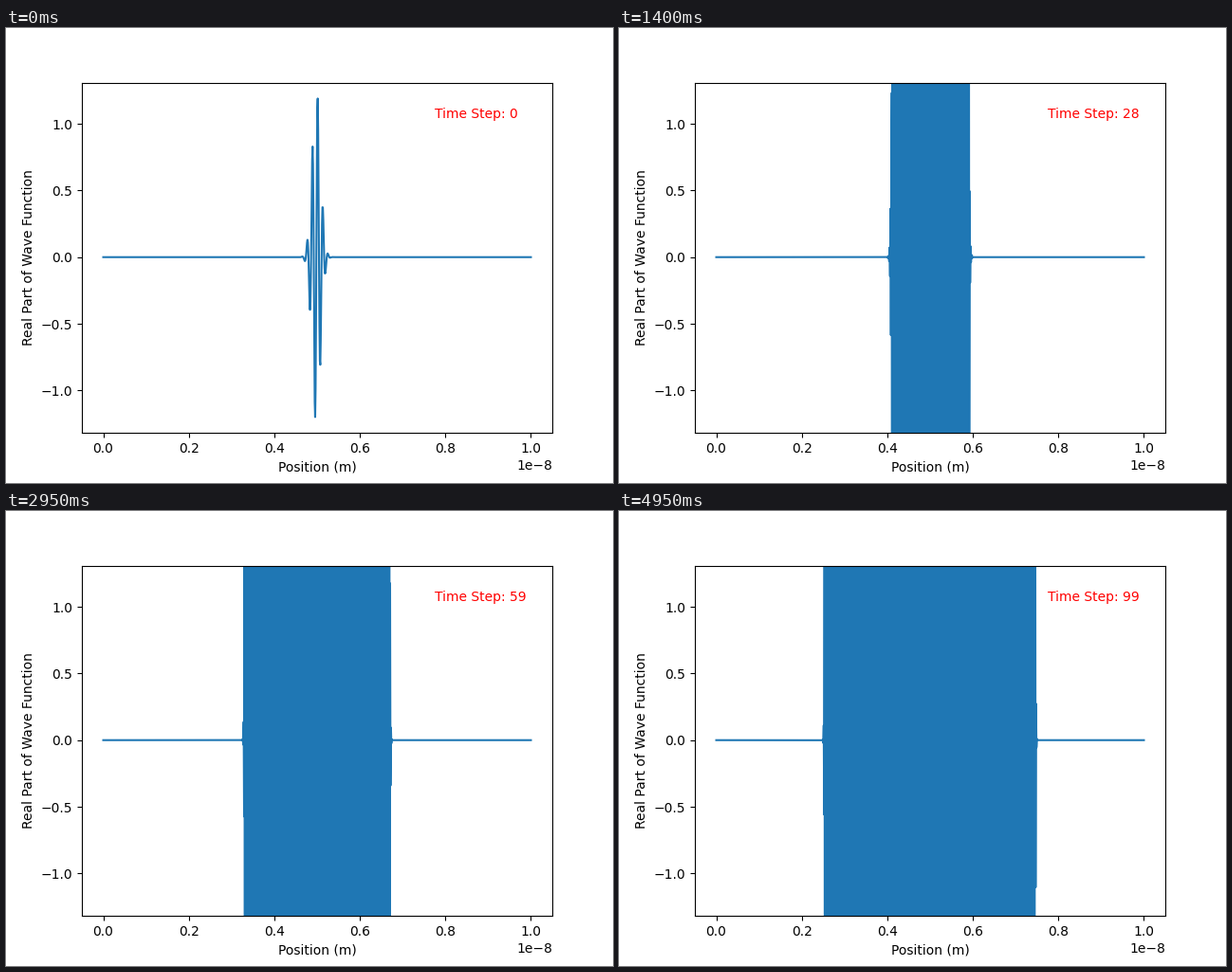
Animation of 640 by 480 pixels, one loop 5000 ms. Source, as a matplotlib script:

```python
import numpy as np
import matplotlib.pyplot as plt
from matplotlib.animation import FuncAnimation

HBAR = 1.0545718e-34
MASS = 9.10938356e-31
LENGTH = 1e-8
POINTS = 1000
DT = 5e-18
STEPS = 100
SIGMA = 1e-10
K0 = 5e10

x = np.linspace(0, LENGTH, POINTS)
dx = x[1] - x[0]


def evolve():
    """Real parts of a Gaussian packet under explicit Euler steps."""
    psi = np.exp(-(x - LENGTH / 2) ** 2 / (2 * SIGMA ** 2)) * np.exp(1j * K0 * x)
    coef = 1j * HBAR * DT / (2 * MASS * dx ** 2)
    waves = []
    for _ in range(STEPS):
        lap = np.zeros_like(psi)
        lap[1:-1] = psi[2:] - 2 * psi[1:-1] + psi[:-2]
        psi = psi - coef * lap
        waves.append(psi.real.copy())
    return waves


waves = evolve()

fig, ax = plt.subplots(figsize=(6.4, 4.8), dpi=100)
line, = ax.plot(x, waves[0])
ax.set_xlabel("Position (m)")
ax.set_ylabel("Real Part of Wave Function")
label = ax.text(0.75, 0.9, "Time Step: 0", color="red", transform=ax.transAxes)


def update(step):
    line.set_ydata(waves[step])
    label.set_text(f"Time Step: {step}")
    return line, label


anim = FuncAnimation(fig, update, frames=STEPS, interval=50,
                     repeat=True, repeat_delay=0)
plt.show()
```
